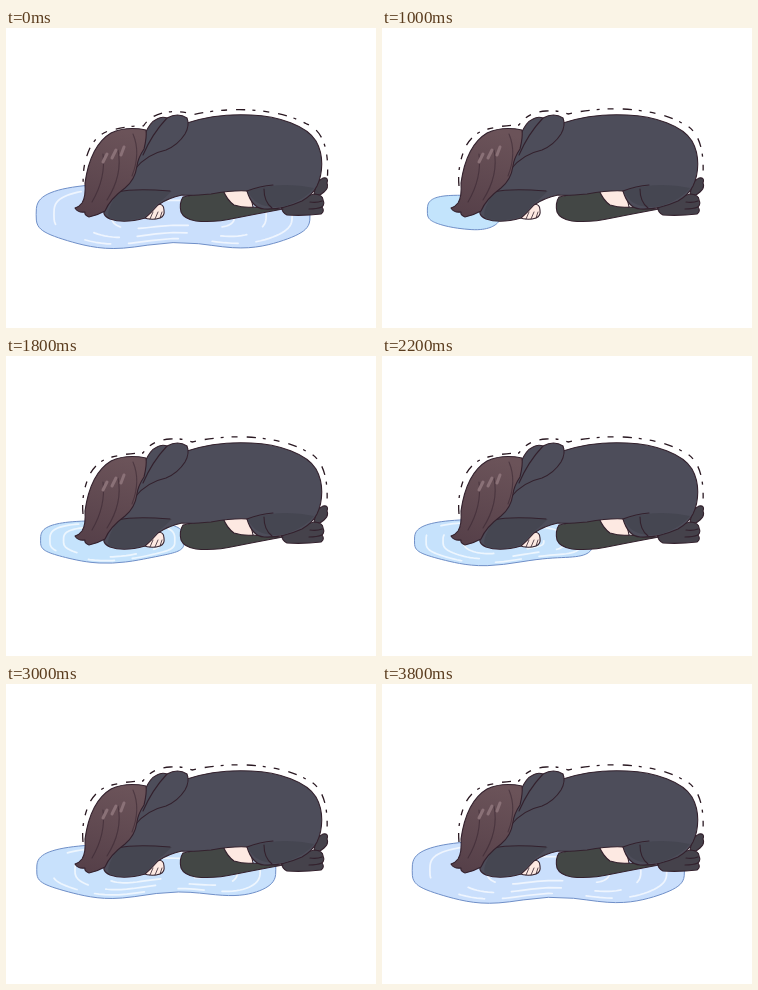
An HTML page that plays this animation: 370x300 px, repeating every 4000 ms.

```html
<!DOCTYPE html>
<html lang="en">
<head>
<meta charset="utf-8">
<title>Puddle of tears</title>
<style>
  html, body { margin: 0; width: 100%; height: 100%; overflow: hidden; background: #fff; }
  svg { display: block; width: 370px; height: 300px; }
  path { stroke-linecap: round; stroke-linejoin: round; }
  .ink { stroke: #33212d; stroke-width: 1.1; }
  .line { fill: none; }
  .coat { fill: #4d4d5a; }
  .shade { fill: #454651; stroke: none; }
  .sock { fill: #434745; }
  .shoe { fill: #45424b; }
  .skin { fill: #fde9e2; }
  .shine { fill: none; stroke: #8a7177; stroke-width: 3; }
  .shake { fill: none; stroke: #2a1922; stroke-width: 1.3; stroke-dasharray: 9 7 3 8 6 9; stroke-linecap: butt; }
  .out .shake { stroke-dashoffset: 11; transform: translate(.5px, .8px); }
</style>
</head>
<body>
<svg id="stage" viewBox="0 0 370 300">
  <defs>
    <linearGradient id="lock" x1=".5" y1="0" x2=".3" y2="1">
      <stop offset="0" stop-color="#6b5359"/>
      <stop offset="1" stop-color="#564049"/>
    </linearGradient>
  </defs>

  <path id="puddle" stroke="#6f8fc8"/>
  <g id="rings" fill="none" stroke="#fff" stroke-width="1.7" stroke-dasharray="50 18 26 34"></g>

  <g class="ink">
    <path class="shoe" d="M308,166 Q310,153 317,150 Q323,149 321,155 Q323,160 318,164 Q313,169 308,166Z"/>
    <path class="shoe" d="M275,178 Q290,169 309,166 Q317,167 317,172 Q319,176 316,179 Q319,183 315,186 Q298,188 281,187 Q276,185 275,178Z"/>
    <path class="line" d="M304,174 Q311,175 316,173 M303,181 Q311,181 316,179"/>
    <path class="sock" d="M177,169 Q196,165 219,163 Q221,173 229,177 Q250,180 277,181 Q250,186 230,190 Q208,195 190,193 Q178,191 175,184 Q173,175 177,169Z"/>
    <path class="skin" d="M217,162 Q221,172 228,177 Q238,180 247,179 L243,160Z"/>
    <path class="skin" d="M136,189 Q141,178 152,176 Q158,176 158,182 Q159,188 154,190 Q145,193 136,189Z"/>
    <path class="line" stroke-width=".8" d="M144,191 L147,184 M149,191 L152,184 M154,190 L156,184"/>
  </g>

  <g class="ink">
    <path class="coat" d="M130,136 C140,118 160,104 181,95 C205,87 225,86 245,87 C273,88 301,98 310,113 C318,127 317,145 311,158 C308,164 303,169 296,173 Q276,182 258,181 Q246,180 241,163 Q228,162 205,166 Q185,168 176,167 Q162,170 152,177 Q145,185 139,190 Q118,196 104,191 Q95,187 99,180 Q106,166 118,158Z"/>
    <path class="shade" d="M112,164 Q135,160 166,163 Q158,171 150,177 Q145,184 139,189 Q118,195 104,190 Q98,186 112,164Z"/>
    <path class="shade" d="M242,163 Q275,153 308,160 Q300,171 280,178 Q250,183 242,163Z"/>
    <path class="line" d="M241,163 Q254,158 267,157 M258,161 Q258,174 266,180 M112,164 Q128,160 164,163"/>
    <path class="coat" d="M129,139 Q136,122 139,106 Q144,94 151,91 Q156,88 161,90 Q172,84 181,90 Q184,97 179,106 Q172,117 160,122 Q141,126 129,141Z"/>
    <path class="line" d="M161,90 Q146,106 137,127"/>
  </g>

  <path class="ink" fill="url(#lock)" d="M140,102 Q120,98 105,105 C90,114 82,134 79,155 Q80,169 76,175 Q73,179 69,180 Q72,185 79,184 Q78,187 83,189 Q92,187 99,183 Q104,171 119,160 Q129,152 131,138 Q132,130 138,121 Q141,109 140,102Z"/>
  <path class="line ink" stroke-opacity=".5" d="M127,106 Q135,125 126,148 M112,122 Q117,147 101,172 M97,126 Q100,150 86,174"/>
  <path class="shine" d="M97,134 L101,126 M106,130 L110,122 M115,127 L118,119"/>

  <path class="shake" d="M77,158 Q75,137 84,118 Q92,104 106,101 Q122,97 137,97 Q146,84 164,83 Q177,82 186,86 Q212,80 241,81 Q278,83 300,95 Q323,104 321,147"/>
</svg>

<script>
const STEP = 200, COUNT = 20, POINTS = 96;
const $ = id => document.getElementById(id);
const mix = (a, b, k) => a + (b - a) * k;
const smooth = k => k * k * (3 - 2 * k);
const bulge = v => Math.sign(v) * Math.abs(v) ** .62;

const rings = [.87, .68, .45].map((size, i) => {
  const path = document.createElementNS('http://www.w3.org/2000/svg', 'path');
  path.setAttribute('stroke-dashoffset', i * 37);
  $('rings').append(path);
  return { path, size, start: .3 + i * .08 };
});

// The water shoots left at first, then spreads right and down under the figure.
function outline(frame, size = 1) {
  const k = frame / COUNT;
  const left = 30 + 70 * Math.exp(-frame / 3.3);
  const right = mix(85, 304, smooth(k));
  const top = mix(169, 155, k ** 1.5);
  const bottom = mix(192, 218, k);
  const cx = (left + right) / 2, cy = (top + bottom) / 2;
  let d = '';
  for (let i = 0; i < POINTS; i++) {
    const a = i / POINTS * 2 * Math.PI;
    const x = cx + (right - left) / 2 * bulge(Math.cos(a)) * size;
    const swell = Math.cos((x - 100) / 145 * 2 * Math.PI) * Math.max(0, Math.sin(a)) * 3.5;
    const y = cy + (bottom - top) / 2 * bulge(Math.sin(a)) * size + swell;
    d += `${i ? 'L' : 'M'}${x.toFixed(2)},${y.toFixed(2)}`;
  }
  return d + 'Z';
}

function draw(index) {
  const frame = index || COUNT;
  const k = frame / COUNT;
  const puddle = $('puddle');
  puddle.setAttribute('d', outline(frame));
  puddle.setAttribute('fill', `rgb(${mix(192, 202, k)},${mix(230, 223, k)},252)`);
  for (const { path, size, start } of rings) {
    path.setAttribute('d', outline(frame, size));
    path.setAttribute('opacity', k > start ? .7 : 0);
  }
  $('stage').classList.toggle('out', index % 2 === 0);
}

const begin = performance.now();
let shown = -1;
function tick() {
  const index = Math.floor((performance.now() - begin) / STEP) % COUNT;
  if (index !== shown) draw(shown = index);
  requestAnimationFrame(tick);
}
tick();
</script>
</body>
</html>
```
